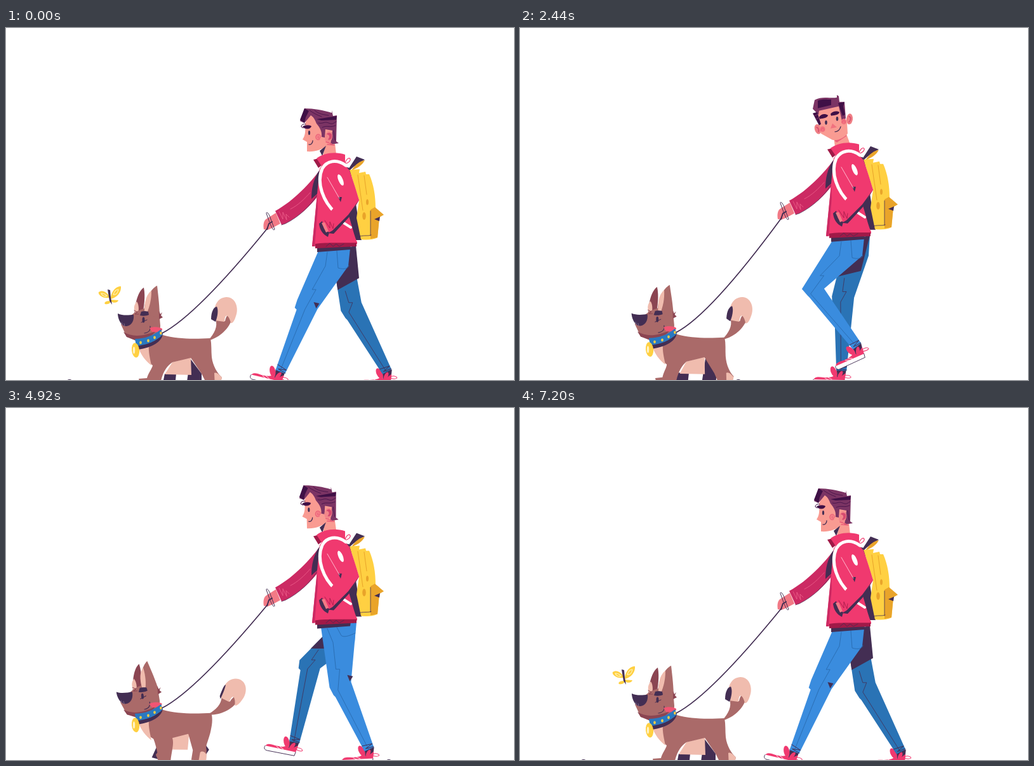
These frames come from a looping animation (800x556 px, 7.24 s). An HTML page with a canvas:

```html
<!DOCTYPE html>
<html lang="en">
<head>
<meta charset="utf-8">
<title>Walking the dog</title>
<style>
html, body { margin: 0; width: 100%; height: 100%; overflow: hidden; background: #fff }
canvas { display: block }
</style>
</head>
<body>
<canvas id="stage" width="800" height="556"></canvas>
<script>
const ctx = document.getElementById('stage').getContext('2d');
const LOOP = 7240, STEP = 1440, BOUND = 400, ROLL = 1800, TAU = Math.PI * 2;
const INK = '#432e53', PINK = '#f0396f', ROSE = '#cc2a63', WINE = '#a01a48', SKIN = '#f99b92', BLUSH = '#ea5c78',
  HAIR = '#7b3464', PLUM = '#3f1046', YELLOW = '#ffd042', AMBER = '#e9a42a', BLUE = '#3a8cde', NAVY = '#2a73b5',
  FUR = '#aa6a69', FURDARK = '#8b4552', CREAM = '#f0bcae';

const fill = (color, d) => { ctx.fillStyle = color; ctx.fill(new Path2D(d)); };
const line = (color, width, d) => {
  ctx.strokeStyle = color; ctx.lineWidth = width; ctx.stroke(new Path2D(d));
};
const oval = (color, x, y, rx, ry, turn = 0) => {
  ctx.fillStyle = color; ctx.beginPath(); ctx.ellipse(x, y, rx, ry, turn, 0, TAU); ctx.fill();
};
const group = (x, y, draw) => { ctx.save(); ctx.translate(x, y); draw(); ctx.restore(); };
const pivot = (x, y, turn, draw) => group(x, y, () => { ctx.rotate(turn); ctx.translate(-x, -y); draw(); });
const clamp = (v, lo, hi) => Math.min(hi, Math.max(lo, v));
const mix = (a, b, k) => a.map((v, i) => v + (b[i] - v) * k);
const morph = (a, b, k) => {
  const to = b.match(/[\d.]+/g);
  let i = 0;
  return a.replace(/[\d.]+/g, n => +n + (to[i++] - n) * k);
};
const poly = pts => 'M' + pts.map(p => p.join(' ')).join('L');

// phase, knee x y, ankle x y, foot angle
const GAIT = [
  [0, 475, 437, 432, 543, 12], [.07, 484, 434, 456, 543, 0], [.194, 501, 425, 498, 541, 0], [.25, 518, 420, 520, 542, 0],
  [.389, 523, 435, 562, 539, -4], [.417, 527, 437, 572, 539, -4], [.5, 536, 440, 592, 543, -4],
  [.6, 505, 428, 572, 522, -30], [.694, 462, 412, 531, 503, -25], [.75, 450, 400, 508, 497, -8],
  [.889, 466, 400, 450, 520, 11], [.917, 471, 405, 446, 528, 11], [.972, 464, 428, 432, 541, 12], [1, 475, 437, 432, 543, 12]
];
function gait(p) {
  const i = GAIT.findIndex(k => k[0] > p), a = GAIT[i - 1], b = GAIT[i];
  return mix(a, b, (p - a[0]) / (b[0] - a[0]));
}

function shoe(x, y, angle) {
  group(x, y, () => {
    ctx.rotate(angle * Math.PI / 180);
    fill(INK, 'M-8-3L8-3L5 13L-7 13Z');
    fill(PINK, 'M-44 16C-43 9-36 10-28 11C-20 11-14 11-10 7L-5 12L7 4L5 16Z');
    fill('#fff', 'M-44 14L5 15L4 21L-39 21C-44 21-45 17-44 14Z');
    line(INK, .9, 'M-44 14C-46 18-44 21-39 21L4 21L5 15');
    oval(PINK, -12, 2, 4.5, 9, -.4);
    oval(PINK, -2, 7, 3, 7, .5);
    line('#fff', .8, 'M-26 12L-20 15M-21 11L-15 14');
    line(PINK, 1, 'M3 9C9 6 15 8 15 11C12 13 8 12 3 10');
  });
}

function leg(p, bob, far) {
  const dx = far ? 8 : 0;
  let [, kx, ky, ax, ay, foot] = gait(p);
  kx += dx; ax += dx;
  const sway = far ? 1 : clamp((kx - 475) / 45, 0, 1), back = 542 + 10 * sway;
  const h1 = [far ? 513 : 492 + 4 * sway, 352 + bob], h2 = [back - (far ? 1 : 0), 348 - 4 * sway + bob];
  const seat = [back - 3, 376 + bob];
  const unit = (x, y) => { const l = Math.hypot(x, y); return [x / l, y / l]; };
  const thigh = unit(kx - 518, ky - 350 - bob), shin = unit(ax - kx, ay - ky);
  const [bx, by] = unit(thigh[0] + shin[0], thigh[1] + shin[1]);
  const front = [kx - by * 18, ky + bx * 18], rear = [kx + by * 17, ky - bx * 17];
  const a1 = [ax - shin[1] * 8, ay + shin[0] * 8], a2 = [ax + shin[1] * 8, ay - shin[0] * 8];
  const low = [front[0] + shin[0] * 13 + 1, front[1] + shin[1] * 13];

  shoe(ax, ay, foot);
  fill(far ? NAVY : BLUE, poly([h1, h2, seat, rear, a2, a1, [low[0] + 3, low[1] + 3], low, front]));
  if (far) {
    fill(INK, poly([h1, h2, mix(h2, rear, .57), mix(h1, front, .65)]));
  } else if (p < .55 || p > .93) {
    const [x, y] = rear;
    fill(INK, `M${x - 6} ${y - 11}L${x + 3} ${y - 9}L${x - 2} ${y - 1}Z`);
  }
  const seam = far ? INK : '#2868aa', mid = mix(front, rear, .45);
  const start = far ? mix(h1, front, .65).map((v, i) => v + (i ? 2 : 12)) : [506, 354 + bob];
  const bend = mix(start, mid, .72);
  const inner = far ? [bend] : [[503 + 12 * sway, 376 + bob], bend];
  line(seam, .8, poly([start, ...inner, [bend[0] + 6, bend[1]], [mid[0] - 2, mid[1] + 8], mix(a1, a2, .45)]));
  const cuff = (u, v) => [mix(a1, a2, u)[0] - shin[0] * v, mix(a1, a2, u)[1] - shin[1] * v];
  line(INK, 1, poly([cuff(0, 9), cuff(1, 6), cuff(.2, 3), cuff(1, 1)]));
  if (!far) {
    const drop = 27 - 14 * sway;
    line(seam, .8, `M521 ${352 + bob}L${523 + 5 * sway} ${352 + drop + bob}C532 ${355 + drop + bob} 540 ${353 + drop + bob} ${back - 2} ${348 + drop + bob}`);
  }
}

function profile() {
  fill(SKIN, 'M471 151L476 139L492 136L516 150L518 182L520 199L499 201L503 187C498 192 486 196 474 195L474 180L467 176C471 170 472 164 471 151Z');
  fill(INK, 'M494 194L504 186L498 202Z');
  fill(HAIR, 'M470 127C485 127 500 130 513 134L513 130L515 139L521 138L520 179L524 182L511 184L514 162L503 160L502 173L497 172C498 163 494 157 489 151C487 146 485 141 480 138L470 150L463 147Z');
  fill(PLUM, 'M470 127L477 131L472 141L470 150L463 145Z');
  fill(PLUM, 'M489 144L521 139L520 145L497 146Z');
  line(PLUM, .8, 'M478 130C485 135 489 137 497 140M486 130C492 136 501 137 508 138M492 150C499 152 501 147 508 150S515 150 520 148M498 157C506 153 510 158 519 154M516 162L518 177');
  oval('#f2878a', 508, 172, 6, 9, .2);
  fill('#d64a70', 'M505 168C508 163 515 166 513 173C512 176 508 178 507 176C511 172 509 168 505 168Z');
  line(BLUSH, 1.4, 'M504 180L513 183M506 184L517 185');
  fill(PLUM, 'M467 156C470 153 477 153 481 155C480 160 471 161 467 156Z');
  line(PLUM, 1, 'M472 152C468 151 465 153 465 156L468 158');
  oval(INK, 477.5, 165.5, 1.6, 3.5);
  line(INK, 1.3, 'M483 178C483 182 480 185 477 184');
  oval('#f48088', 491.5, 172, 4, 4.5);
  line(BLUSH, 1, 'M494 176C489 179 486 173 489 169C493 166 497 170 495 173C493 176 490 173 492 171');
}

function frontFace() {
  fill(SKIN, 'M494 172L512 162L520 184L496 188Z');
  fill(BLUSH, 'M495 178L513 166L514 171L499 181Z');
  oval('#ef7f84', 469, 160, 5, 8, -.3);
  oval('#ef7f84', 519, 144, 5, 8.5, .1);
  line('#d64a70', 1.5, 'M467 157C470 158 471 161 470 164M518 140C522 141 521 146 518 149');
  fill(SKIN, 'M468 131C480 124 495 121 505 121L509 135L515 150L516 167C510 174 500 179 492 177L474 167L471 152Z');
  fill(HAIR, 'M461 128L464 114C475 107 490 112 499 110L499 106L502 108L503 117L511 117L513 143L507 147L502 124L471 131L470 137Z');
  fill(PLUM, 'M469 115C478 111 487 114 490 113L490 122L469 127Z');
  fill(PLUM, 'M461 135L468 133L474 152L471 154ZM501 119L511 117L509 124L512 137L508 139Z');
  line(HAIR, 1, 'M464 139L470 136M466 144L472 141');
  fill(PLUM, 'M471 141C474 136 480 135 485 138C485 142 477 143 472 144ZM489 136C493 131 499 131 503 133C503 137 496 138 490 139Z');
  oval(INK, 482, 149.5, 1.8, 3.4);
  oval(INK, 499.5, 143.5, 1.8, 3.4);
  fill('#f0727f', 'M492 151L499 157L489 159Z');
  line(INK, 1.3, 'M496 164C500 164 504 161 505 156');
  oval('#f2727f', 476.5, 160, 4, 4.5);
  oval('#f2727f', 510, 148, 4, 4.5);
  line(BLUSH, 1, 'M474 162C474 157 480 157 479 162M507 150C507 145 513 145 512 150');
}

function backpack() {
  fill(INK, 'M541 220L552 203L565 208C557 212 548 218 541 225Z');
  fill(AMBER, 'M544 225C550 215 558 210 565 209C561 217 552 222 544 225Z');
  fill(INK, 'M531 219L542 221L560 335L548 335L538 298Z');
  fill(YELLOW, 'M541 224L557 223L556 229L566 227L567 231L572 231C579 247 582 265 582 285L587 288L588 300L585 331C577 335 568 335 559 334L552 300L556 272Z');
  fill(AMBER, 'M574 287L581 283L595 295L588 299L585 331L574 333Z');
  fill(INK, 'M580 302L589 298L588 305Z');
  line(AMBER, 1, 'M554 232L562 288M564 233L568 263');
  oval(AMBER, 569, 275, 2, 4.5);
  oval(AMBER, 564, 297, 2.8, 6);
  line(INK, .8, 'M557 329C565 327 570 329 575 327M574 289V328');
  line(PINK, 1.2, 'M534 214C536 206 541 204 542 207C543 210 538 214 534 214');
}

function torso() {
  fill('#f27a86', 'M425 292L411 301C405 304 405 312 406 318L412 319L419 316L432 309Z');
  line(INK, 1, 'M410 292C411 289 415 295 417 302L423 318C421 322 417 312 414 304Z');
  line(INK, 2, 'M411 318L414 309L419 306');
  fill(ROSE, 'M493 226C480 243 455 272 424 289L434 311L440 309C462 298 480 280 494 262Z');
  line(INK, .7, 'M434 311L440 309C462 298 480 280 490 264');
  fill(INK, 'M494 224C484 238 481 254 481 270L491 261Z');
  line('#f0638d', .8, 'M430 290L436 302L436 291L442 303L441 294L446 299M448 286C460 280 470 270 479 260');
  backpack();
  fill(INK, 'M490 346L543 343L542 350L490 354Z');
  fill(WINE, 'M484 208L492 206L497 217L492 221Z');
  fill(PINK, 'M489 206C500 197 520 195 534 200L534 217L541 225C548 245 552 258 556 272L540 297C547 320 549 330 553 338L553 341L482 345L490 262L494 222L497 218Z');
  fill(ROSE, 'M490 264L491 285L486 345L482 345Z');
  fill(WINE, 'M487 341C505 338 535 340 552 339L552 345L487 348Z');
  line(INK, .8, 'M504 345L510 340L515 345L520 341L525 345L532 341');
  line('#fff', 5, 'M535 217C520 206 505 210 498 222C488 245 500 275 519 292');
  line('#fff', 4, 'M532 308L543 315');
  fill(PINK, 'M521 262L541 235L556 272L540 297L514 324L500 304L524 274Z');
  fill(INK, 'M555 273L540 299L516 325L507 324L514 320L539 295Z');
  fill(INK, 'M523 267L529 267L527 275Z');
  fill(INK, 'M493 309L498 305L501 317L509 323L507 330C499 326 494 319 493 309Z');
  fill('#f27a86', 'M497 308L502 307L508 321L504 323Z');
  line(WINE, .8, 'M502 304L510 316L510 306L515 317L516 309');
  line('#ffc9d8', .9, 'M506 236L525 269');
  oval('#fff', 527, 240, 3.5, 9.5, -.4);
}

function butterfly(u) {
  const x = u < 0 ? -.2 * u : -.3 * u, y = u < 0 ? -.22 * u : -.06 * u - 8 * Math.sin(u / 110);
  group(163 + x, 424 + y, () => {
    const flap = .65 + .35 * Math.cos(u / 240 * TAU);
    ctx.save();
    ctx.scale(flap, 1);
    fill(YELLOW, 'M-1 2C-10 4-19-3-17-7C-11-11-4-7 0 0ZM2 1C4-9 10-16 18-16C19-7 12 2 2 4ZM1 5L14 6C13 10 7 11 2 8ZM0 7C-6 7-9 10-7 12C-1 13 2 10 1 8Z');
    line('#fff2b8', 1.2, 'M-4-1C-8-5-12-5-13-5C-12-1-7 1-4-1M6-3C8-9 11-11 14-11C13-5 10-2 6-3');
    ctx.restore();
    fill(INK, 'M-3-11L1-10L2 2L4 13L0 7Z');
  });
}

function dogHead(k) {
  const ear = -.33 * k;
  pivot(212, 452, ear * .2, () => {
    fill(FURDARK, 'M202 454C203 434 208 416 217 410C220 425 217 440 215 454Z');
    fill(CREAM, 'M203 449C200 440 203 436 206 432C210 438 209 446 208 452Z');
  });
  fill(FUR, 'M198 453C205 447 212 445 218 443L241 447L243 470C244 480 230 488 216 491L190 488L181 468Z');
  pivot(230, 452, ear, () => {
    fill(FUR, 'M217 452C217 430 228 412 238 407C240 425 242 440 242 458Z');
    fill(CREAM, 'M218 447C218 430 222 420 229 415C229 430 226 440 222 450Z');
  });
  fill(FURDARK, 'M185 480C200 489 215 487 236 479L226 489L205 494L190 488Z');
  fill(INK, 'M176 451C184 455 195 453 201 453C202 462 198 470 190 471C182 472 176 460 176 451Z');
  line('#8a7796', .8, 'M182 465L184 470M186 467L187 471');
  fill(INK, 'M213 448C216 447 221 447 224 448L225 453C221 455 215 455 211 454Z');
  line(FURDARK, 1, 'M202 446L207 449L203 452L209 452');
  oval(INK, 216.5, 461, 2, 4.5);
  line(INK, 1, 'M213 465L222 461');
  line(INK, 1.2, 'M218 482C226 481 228 476 227 471');
  fill('#f15573', 'M226 474C232 471 242 472 246 475C247 479 240 481 230 480Z');
  fill(FURDARK, 'M241 447L243 452L246 449L244 454L247 457L241 460Z');
}

function dog(k) {
  group(0, -12.5 * k, () => {
    fill(INK, morph('M250 546L268 546L266 566L246 566Z', 'M231 541L246 552L243 566L221 557Z', k));
    fill(INK, morph('M290 522L308 546L308 566L284 566Z', 'M312 528L326 549L308 566L304 548Z', k));
    pivot(322, 491, k * .5, () => {
      fill(FUR, 'M319 493C328 482 334 472 330 460L345 463C347 451 354 449 357 456C352 476 335 489 321 493Z');
      fill(CREAM, 'M329 462C325 445 330 426 347 425C362 425 367 443 362 455C360 462 357 467 354 466C352 456 345 447 344 464Z');
      group(329, 0, () => {
        ctx.scale(1 - k, 1);
        fill(INK, 'M-6 460C-6 448-2 441 3 440C6 446 4 456 1 464Z');
      });
    });
    fill(CREAM, morph('M262 528L291 520L292 548L250 547Z', 'M260 530L287 523L283 548L266 548Z', k));
    fill(FUR, morph(
      'M208 503C222 500 240 492 247 485C270 492 300 491 322 490C324 500 323 510 324 520C326 535 333 545 340 552L336 566L318 566L308 546L291 521L262 528C252 535 246 545 242 566L212 566L209 554L222 553C224 545 230 538 231 533C222 525 214 515 208 503Z',
      'M208 503C222 500 240 492 247 485C270 492 300 491 324 490C327 500 325 508 322 515C316 532 303 540 303 546L304 564L278 563L287 550L285 524L262 530C272 540 268 555 268 568L256 568L250 557L247 552C243 545 238 538 233 530C222 525 214 515 208 503Z', k));
    fill(CREAM, 'M208 504L225 501C224 512 227 522 229 533C220 526 212 516 208 504Z');
    fill(CREAM, morph('M328 545C332 543 336 548 340 552L336 566L329 566Z', 'M294 556C298 552 302 554 303 558L304 564L290 564Z', k));
    pivot(246, 482, -.12 * k, () => dogHead(k));
    fill(INK, 'M205 501C222 500 236 495 247 483C246 495 230 505 208 508Z');
    fill('#2a79c0', 'M203 491C218 491 232 486 244 476L247 484C236 495 222 501 205 502Z');
    for (const [x, y] of [[212, 497], [224, 494], [234, 489], [244, 482]]) oval(YELLOW, x, y, 1.8, 2.4);
    oval(YELLOW, 204, 509, 6, 11.5, -.1);
    oval('#fff3c4', 201.5, 509, 1.7, 5.5);
  });
}

function render(t) {
  ctx.fillStyle = '#fff';
  ctx.fillRect(0, 0, 800, 556);
  ctx.lineCap = ctx.lineJoin = 'round';

  const roll = t % ROLL;
  if (roll < 1685) oval(INK, 100 + roll * .381, 559, 5, 4);
  else if (roll > 1715) oval(INK, 100 + (roll - ROLL) * .381, 559, 5, 4);

  const u = t < LOOP / 2 ? t : t - 7200;
  if (u > -330 && u < 760) butterfly(u);

  const p = t % STEP / STEP, lift = ((1 - Math.cos(p * 2 * TAU)) / 2) ** .85, bob = -18 * lift;
  leg((p + .5) % 1, bob, true);
  leg(p, bob, false);
  group(0, bob, () => {
    if (t > 2200 && t < 3480) group(0, 16, frontFace);
    else pivot(510, 195, -.07 * lift, profile);
    torso();
  });

  const hop = (1 - Math.cos(t / BOUND * TAU)) / 2, collar = 482 - 12.5 * hop;
  dog(hop);
  line(INK, 1.7, `M246 ${collar}Q300 ${collar - 28} 412 ${316 + bob}`);
}

function tick() {
  render(Math.floor(performance.now() % LOOP / 40) * 40);
  requestAnimationFrame(tick);
}
tick();
</script>
</body>
</html>
```
